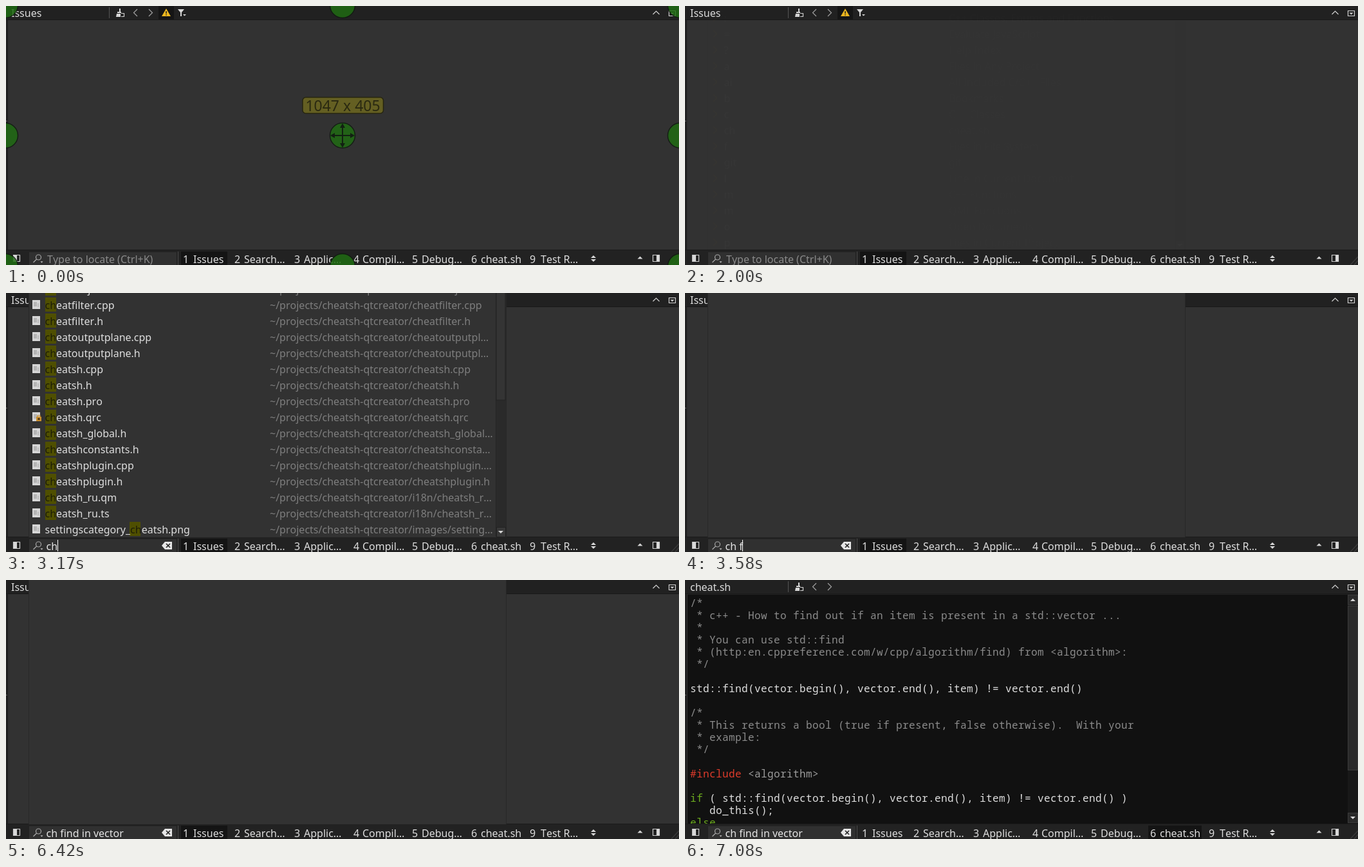
An HTML page for the animation above (8 s loop, 1046x404 px).

```html
<!DOCTYPE html>
<html lang="en">
<head>
<meta charset="utf-8">
<title>Locator search</title>
<style>
  html, body { margin: 0; width: 100%; height: 100%; overflow: hidden; background: #323232; }
  svg { display: block; width: 100%; height: 100%; }
  text { font: 16px "Noto Sans", sans-serif; font-kerning: none; fill: #dedede; white-space: pre; }
  .dim { fill: #7e7e7e; }
  .mono { font: 16px "Noto Sans Mono", monospace; letter-spacing: .4px; }
  .comment { fill: #8b8b8b; }
  .red { fill: #dc3b2b; }
  .green { fill: #6cab1f; }
  .line { fill: none; stroke: #d0d0d0; stroke-width: 1.2; }
  .icon { fill: #d8d8d8; }
</style>
</head>
<body>
<svg id="stage" viewBox="0 0 1046 404" preserveAspectRatio="none"></svg>
<script>
const LOOP = 8000, STEP = 250 / 3;
const QUERY = 'ch find in vector', QUERY_X = 62.5;
// [step, typed characters]
const TYPING = [[33, 1], [36, 2], [39, 3], [43, 4], [47, 5], [48, 6], [50, 8],
  [53, 9], [57, 11], [60, 12], [63, 13], [65, 14], [69, 16], [71, 17]];

const esc = s => s.replace(/&/g, '&amp;').replace(/</g, '&lt;');
const text = (x, y, s, cls = '') => `<text x="${x}" y="${y}" class="${cls}">${esc(s)}</text>`;
const rect = (x, y, w, h, fill, more = '') =>
  `<rect x="${x}" y="${y}" width="${w}" height="${h}" fill="${fill}" ${more}/>`;
const path = (d, cls = 'icon', more = '') => `<path d="${d}" class="${cls}" ${more}/>`;
const group = (id, body) => `<g id="${id}">${body}</g>`;
const triangle = (x, y, dir, r = 4) => path(`M${x - r} ${y}h${2 * r}l${-r} ${dir * r}z`);

function topBar() {
  return rect(0, 0, 1046, 21, '#212121') + rect(0, 21, 1046, 1, '#191919') +
    rect(160, 2, 1, 17, '#555') +
    path('M176 4h2v5h-2zM173 9h6v2h-6zM172 12h6v5h-7z') +
    path('M179 11.500h4.500v5h-4.500', 'line') +
    path('M204 5l-5.500 5.500l5.500 5.500M222 5l5.500 5.500l-5.500 5.500', 'line', 'style="stroke:#a2a2a2"') +
    path('M1005.500 13l5-5l5 5', 'line') +
    path('M1030.500 7.500h10v8h-10z', 'line') + triangle(1035.5, 10.5, 1, 3);
}

function issueTools() {
  return text(8, 17, 'Issues') + rect(237, 0, 24, 21, '#151515') +
    path('M249 4l7 12h-14z', '', 'fill="#efb91f"') +
    rect(248.3, 8, 1.5, 4, '#222') + rect(248.3, 13, 1.5, 1.5, '#222') +
    path('M267 5h10l-4 5v6h-2v-6z') + triangle(277.5, 13, 1, 2.5);
}

function paneEdge() {
  return rect(0, 22, 3, 358, '#242424') + rect(2, 22, 1, 358, '#1b1b1b') + rect(0, 179, 2, 1, '#686868');
}

function statusBar() {
  const tabs = [[275, 291, 'Issues'], [355, 370, 'Search…'], [448, 463, 'Applic…'],
    [540, 554, 'Compil…'], [631, 646, 'Debug…'], [723, 738, 'cheat.sh'], [814, 831, 'Test R…']];
  const labels = tabs.map(([nx, x, label], i) =>
    text(nx, 401, String(i < 6 ? i + 1 : 9)) + text(x, 401, label)).join('');
  return rect(0, 380, 1046, 24, '#222') + rect(0, 380, 1046, 1, '#1b1b1b') +
    rect(36, 384, 229, 20, '#303030') + rect(267, 383, 1, 21, '#4a4a4a') +
    '<rect id="tab" y="383" height="21" fill="#141414"/>' + labels +
    path('M11.500 388.500h10v10h-10z', 'line') + rect(12, 389, 5, 9, '#d8d8d8') +
    path('M1005.500 388.500h10v10h-10z', 'line') + rect(1011, 389, 5, 9, '#d8d8d8') +
    triangle(913, 393, -1) + triangle(913, 395, 1) + triangle(985.5, 394.5, -1) +
    path('M1046 391l-12 13M1046 397l-6 7', 'line', 'style="stroke:#3c3c3c"') +
    '<circle cx="50.500" cy="392" r="4" class="line" style="stroke:#a8a8a8"/>' +
    path('M47.500 395l-5 5', 'line', 'style="stroke:#a8a8a8"') + triangle(55.5, 398.5, 1, 2) +
    `<text id="hint" x="64" y="401" style="fill:#8a8a8a">Type to locate (Ctrl+K)</text>` +
    `<text id="query" x="${QUERY_X}" y="401" style="fill:#e4e4e4"></text>` +
    rect(0, 385, 1, 18, '#fff', 'id="caret"') +
    group('clear', path('M242 394l5-6h11v12h-11z', '', 'fill="#e6e6e6"') +
      path('M249 391l6 6m0-6l-6 6', 'line', 'style="stroke:#222;stroke-width:1.600"'));
}

function filterList() {
  const rows = [['.', 'C++ Symbols in Current Document'], [':', 'C++ Classes, Enums and Functions'],
    ['=', 'Evaluate JavaScript'], ['?', 'Help Index'], ['a', 'Files in Any Project'],
    ['ai', 'All Included C/C++ Files'], ['b', 'Bookmarks'], ['c', 'C++ Classes'], ['ch', 'cheat.sh'],
    ['f', 'Files in File System'], ['git', 'git'], ['l', 'Line in Current Document'],
    ['m', 'C++ Functions'], ['m', 'QML Functions'], ['o', 'Open Documents'], ['p', 'Files in Current Project']];
  return rows.map(([key, label], i) => {
    const y = i * 25;
    return path(`M44 ${y - 12}l5.500 5.500l-5.500 5.500`, 'line', 'style="stroke:#d2b02c;stroke-width:1.500"') +
      text(60.5, y, key) + text(410, y, label, 'dim');
  }).join('') + scrollBar(3);
}

function fileList() {
  const rows = [['CheatSh.json.in'], ['cheatfilter.cpp'], ['cheatfilter.h'],
    ['cheatoutputplane.cpp', 'cheatoutputpl…'], ['cheatoutputplane.h', 'cheatoutputpl…'],
    ['cheatsh.cpp'], ['cheatsh.h'], ['cheatsh.pro'], ['cheatsh.qrc'],
    ['cheatsh_global.h', 'cheatsh_global…'], ['cheatshconstants.h', 'cheatshconsta…'],
    ['cheatshplugin.cpp', 'cheatshplugin.…'], ['cheatshplugin.h'],
    ['cheatsh_ru.qm', 'i18n/cheatsh_r…'], ['cheatsh_ru.ts', 'i18n/cheatsh_r…'],
    ['settingscategory_cheatsh.png', 'images/setting…']];
  return rows.map(([name, tail = name], i) => {
    const y = i * 25, at = name.toLowerCase().indexOf('ch');
    const badge = name.endsWith('.qrc')
      ? rect(47, y - 7, 8, 7, '#c98d2b') + rect(49.5, y - 5, 3, 3, '#4a3210') +
        path(`M49 ${y - 7}v-2h4v2`, 'line', 'style="stroke:#c98d2b"') : '';
    return rect(41, y - 14, 12, 14, '#d6d6d6') + rect(43, y - 11, 5, 7, '#b4b4b4') +
      rect(49, y - 9, 2, 6, '#bcbcbc') + badge +
      rect(at ? 192 : 61, y - 18, 17, 22, '#4f4f00') +
      `<text x="60.500" y="${y}">${name.slice(0, at)}<tspan fill="#1d1d08">${name.slice(at, at + 2)}</tspan>${name.slice(at + 2)}</text>` +
      text(410, y, '~/projects/cheatsh-qtcreator/' + tail, 'dim');
  }).join('') + scrollBar(167);
}

function scrollBar(end) {
  return rect(761, 0, 16, 380, '#2a2a2a') + rect(761, 0, 1, 380, '#252525') +
    rect(762, -2, 14, end + 2, '#343434', 'stroke="#222"') +
    rect(762.5, 365.5, 14, 15, '#383838', 'stroke="#222"') + triangle(769, 371, 1);
}

function popup() {
  return rect(35, 0, 743, 381, '#323232') + rect(35, 0, 1, 381, '#292929') +
    rect(777, 0, 1, 381, '#272727') + group('filters', filterList()) + group('files', fileList());
}

function codePane() {
  const lines = ['/*', ' * c++ - How to find out if an item is present in a std::vector ...', ' *',
    ' * You can use std::find', ' * (http:en.cppreference.com/w/cpp/algorithm/find) from <algorithm>:', ' */', '',
    'std::find(vector.begin(), vector.end(), item) != vector.end()', '', '/*',
    ' * This returns a bool (true if present, false otherwise).  With your', ' * example:', ' */', '',
    '#include <algorithm>', '', 'if ( std::find(vector.begin(), vector.end(), item) != vector.end() )',
    '   do_this();', 'else'];
  const paint = line => {
    if (/^( \*|\/\*)/.test(line)) return `<tspan class="comment">${esc(line)}</tspan>`;
    return esc(line).replace(/^(if|else)/, '<tspan class="green">$1</tspan>')
      .replace(/^(#include)(.*)/, '<tspan class="red">$1</tspan><tspan fill="#9c9c9c">$2</tspan>');
  };
  const code = lines.map((line, i) => `<text x="8" y="${42 + 19 * i}" class="mono">${paint(line)}</text>`).join('');
  const raised = (y, h) => rect(1030.5, y, 15, h, '#2a2a2a', 'stroke="#3a3a3a"');
  return rect(4, 22, 1042, 1, '#222') + rect(4, 23, 1042, 357, '#111') + code + text(8, 17, 'cheat.sh') +
    rect(1030, 23, 16, 357, '#181818') + raised(23.5, 15) + raised(40.5, 256) + raised(363.5, 15) +
    triangle(1038, 33, -1) + triangle(1038, 369, 1);
}

function resizeGuide() {
  let out = '';
  for (const x of [-1, 523, 1048]) for (const y of [-1, 202, 406])
    out += `<circle cx="${x}" cy="${y}" r="19.500" fill="#1f6c12" stroke="#101a10" stroke-width="1.500" opacity=".84"/>`;
  for (const turn of [0, 90, 180, 270])
    out += path('M523 201h12v-3l7 4l-7 4v-3h-12z', '', `fill="#122012" transform="rotate(${turn} 523 202)"`);
  return out + rect(461, 142.5, 125.5, 25, '#645f22', 'rx="5" stroke="#26250f" stroke-width="1.500"') +
    '<text x="523.500" y="164" text-anchor="middle" style="font-size:23px;fill:#2a2911">1047 x 405</text>';
}

const stage = document.getElementById('stage');
stage.innerHTML = rect(0, 0, 1046, 404, '#323232') + topBar() + paneEdge() +
  group('issues', issueTools()) + group('code', codePane()) + statusBar() +
  group('popup', popup()) + group('guide', resizeGuide());

const el = {};
for (const node of stage.querySelectorAll('[id]')) el[node.id] = node;
const show = (node, on) => node.setAttribute('display', on ? 'inline' : 'none');
const fade = (node, value) => {
  const v = Math.max(0, Math.min(1, value));
  node.setAttribute('opacity', v);
  show(node, v > 0);
};

function render(ms) {
  const s = Math.floor((ms + 4) / STEP);
  const typed = TYPING.reduce((n, [at, count]) => s >= at ? count : n, 0);
  const done = s >= 80;

  fade(el.guide, [1, 0.4][s] || 0);
  fade(el.popup, s < 24 ? 0 : s < 77 ? (s - 24) / 4 + 0.02 : 1 - (s - 77) / 3);
  show(el.filters, s < 36);
  show(el.files, s >= 36 && s < 39);
  show(el.issues, !done);
  show(el.code, done);
  el.tab.setAttribute('x', done ? 720 : 272);
  el.tab.setAttribute('width', done ? 83 : 72);

  show(el.hint, !typed);
  el.query.textContent = QUERY.slice(0, typed);
  const width = typed ? el.query.getComputedTextLength() : 0;
  el.caret.setAttribute('x', Math.floor(QUERY_X + width));
  show(el.caret, s > 24 && s < 77);
  fade(el.clear, (s - 32) * 0.35);
}

function tick(now) {
  render(now % LOOP);
  requestAnimationFrame(tick);
}
render(0);
const start = performance.now();
requestAnimationFrame(now => tick(Math.max(0, now - start)));
</script>
</body>
</html>
```
